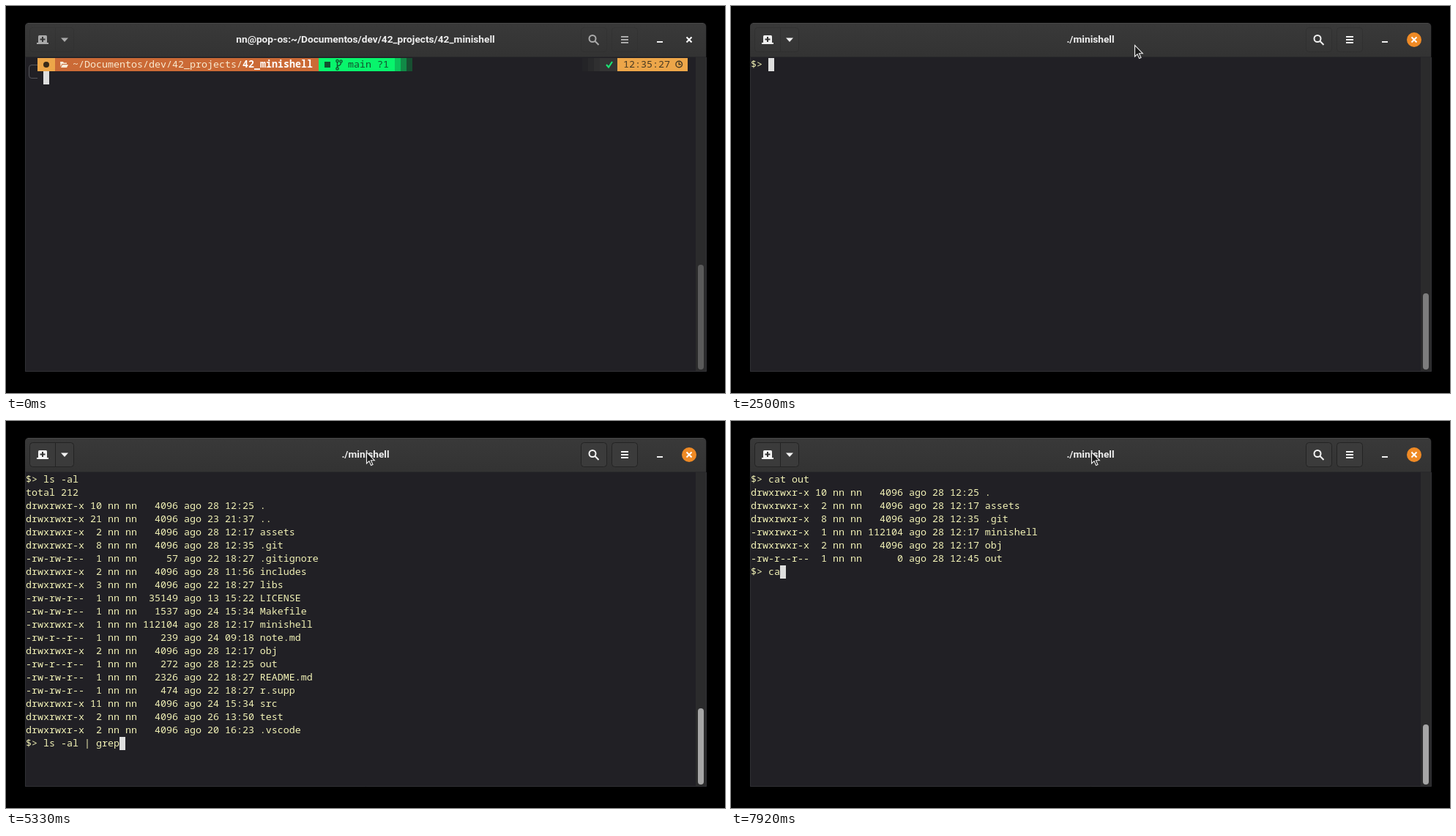
An HTML page with a canvas that plays this animation: 982x528 px, repeating every 8000 ms.

```html
<!DOCTYPE html>
<html lang="en">
<head>
<meta charset="utf-8">
<title>minishell</title>
<style>
html, body { margin: 0; width: 100%; height: 100%; overflow: hidden; background: #000; }
canvas { display: block; }
</style>
</head>
<body>
<canvas id="stage" width="982" height="528"></canvas>
<script>
const ctx = document.getElementById('stage').getContext('2d');
const LOOP = 8000, KEY = 83.3, COL = 8, ROW = 18, LEFT = 27, TOP = 71;
const MONO = '13.333px "Noto Sans Mono", monospace';
const PALE = '#f2f2b6', GREEN = '#22dc78', LIGHT = '#eeeeee';

const clamp = (v, a = 0, b = 1) => Math.min(b, Math.max(a, v));
const ramp = (t, a, b) => clamp((t - a) / (b - a));
const ease = x => x * x * (3 - 2 * x);
const typed = (text, t, start, step = KEY) =>
  text.slice(0, clamp(Math.floor((t - start) / step) + 1, 0, text.length));
const grey = v => `rgb(${v},${v},${v})`;
const mix = (a, b, k) => grey(Math.round(a + (b - a) * k));

// mode, links, size, day, time, name
const listing = `
drwxrwxr-x 10 4096 28 12:25 .
drwxrwxr-x 21 4096 23 21:37 ..
drwxrwxr-x 2 4096 28 12:17 assets
drwxrwxr-x 8 4096 28 12:35 .git
-rw-rw-r-- 1 57 22 18:27 .gitignore
drwxrwxr-x 2 4096 28 11:56 includes
drwxrwxr-x 3 4096 22 18:27 libs
-rw-rw-r-- 1 35149 13 15:22 LICENSE
-rw-rw-r-- 1 1537 24 15:34 Makefile
-rwxrwxr-x 1 112104 28 12:17 minishell
-rw-r--r-- 1 239 24 09:18 note.md
drwxrwxr-x 2 4096 28 12:17 obj
-rw-r--r-- 1 272 28 12:25 out
-rw-rw-r-- 1 2326 22 18:27 README.md
-rw-rw-r-- 1 474 22 18:27 r.supp
drwxrwxr-x 11 4096 24 15:34 src
drwxrwxr-x 2 4096 26 13:50 test
drwxrwxr-x 2 4096 20 16:23 .vscode`.trim().split('\n').map(line => {
  const [mode, links, size, day, time, name] = line.split(' ');
  return `${mode} ${links.padStart(2)} nn nn ${size.padStart(6)} ago ${day} ${time} ${name}`;
});
const matches = listing.filter(l => / 12:/.test(l))
  .map(l => l.replace('272 ago 28 12:25', '  0 ago 28 12:45'));

function rect(x, y, w, h, color) {
  ctx.fillStyle = color;
  ctx.fillRect(x, y, w, h);
}

function round(x, y, w, h, r, fill, stroke) {
  ctx.beginPath();
  ctx.roundRect(x, y, w, h, r);
  if (fill) { ctx.fillStyle = fill; ctx.fill(); }
  if (stroke) { ctx.lineWidth = 1; ctx.strokeStyle = stroke; ctx.stroke(); }
}

function disc(x, y, r, color) {
  ctx.beginPath();
  ctx.arc(x, y, r, 0, 7);
  ctx.fillStyle = color;
  ctx.fill();
}

function path(d, stroke, width = 1, fill) {
  const p = new Path2D(d);
  if (fill) { ctx.fillStyle = fill; ctx.fill(p); }
  if (stroke) { ctx.strokeStyle = stroke; ctx.lineWidth = width; ctx.stroke(p); }
}

function text(s, x, row, color = PALE, bold = false) {
  ctx.font = (bold ? 'bold ' : '') + MONO;
  ctx.textAlign = 'left';
  ctx.fillStyle = color;
  ctx.fillText(s, x, TOP + row * ROW + 13);
}

const caret = (col, row) => rect(LEFT + col * COL, TOP + row * ROW, COL, ROW, '#dedede');

function frame(title, focus) {
  rect(0, 0, 982, 528, '#000');
  round(26, 23, 930.5, 476, [5, 5, 0, 0], '#212025');
  const bar = ctx.createLinearGradient(0, 23, 0, 69);
  bar.addColorStop(0, '#393939');
  bar.addColorStop(1, '#333333');
  round(26, 23, 930, 46, [5, 5, 0, 0], bar);
  rect(30, 23, 922, 1, '#474747');
  rect(26, 69, 930, 1, '#29292b');
  rect(942, 70, 14, 429, '#2b2b2c');
  path('M26.5 70V498.5H956.5V70', '#303034');

  ctx.globalAlpha = 0.15 + 0.85 * ramp(focus, 0.4, 1);
  for (const [x, w] of [[32.5, 60], [785.5, 35], [827.5, 35]])
    round(x, 29.5, w, 33, 4, '#3b3b3b', '#232323');
  rect(67, 30, 1, 32, '#232323');
  ctx.globalAlpha = 1;

  const icon = mix(170, 245, clamp(focus * 2));
  round(44, 40, 12, 11, 1.5, icon);
  rect(42, 50, 16, 2, icon);
  path('M50 42V49M46.5 45.5H53.5', '#363636', 2);
  path('M75 43.5H85L80 49Z', null, 0, icon);
  path('M805.5 44.5a4.5 4.5 0 1 1-9 0a4.5 4.5 0 1 1 9 0M804.5 48L809.5 53', icon, 2);
  for (const y of [41, 45, 49]) rect(840, y, 10, 2, icon);
  rect(889, 48, 8, 2, LIGHT);
  if (focus > 0.05) disc(933, 46, 10, '#ef8a25');
  path('M929.5 42.5L936.5 49.5M936.5 42.5L929.5 49.5', '#fff', 2);

  ctx.font = 'bold 13.7px Roboto, sans-serif';
  ctx.textAlign = 'center';
  ctx.fillStyle = LIGHT;
  ctx.fillText(title, 491, 50);
}

function prompt(input) {
  path('M43 80.5H35Q31.5 80.5 31.5 84V95Q31.5 98.5 35 98.5H43', '#55555a');
  rect(43, 71, 24, 18, '#eda649');
  disc(55, 80, 4, '#3a2a18');
  rect(67, 71, 360, 18, '#cb6a36');
  path('M74 76H78L79 77.5H83V79H76.5L74.5 83ZM77 80H85L83 84H75Z', null, 0, '#f6ead8');
  text('~/Documentos/dev/42_projects/', 91, 0, '#f8ead0');
  text('42_minishell', 323, 0, '#fff', true);

  rect(427, 71, 104, 18, '#08f56c');
  ['#0ac45b', '#118a46', '#184f31'].forEach((c, i) => rect(531 + i * 8, 71, 8, 18, c));
  rect(435, 76, 8, 8, '#12502e');
  path('M452.5 77V84M452.5 82Q457.5 81 457.5 77.5', '#12502e', 1.4);
  for (const [x, y] of [[452.5, 75], [452.5, 85.5], [457.5, 75.5]]) {
    ctx.beginPath();
    ctx.arc(x, y, 1.6, 0, 7);
    ctx.stroke();
  }
  text('main ?1', 467, 0, '#12502e');

  ['#242427', '#29292b', '#2f2f30'].forEach((c, i) => rect(787 + i * 8, 71, 8, 18, c));
  rect(811, 71, 24, 18, '#343434');
  path('M820 80L823 83.5L828 76', '#1be574', 2.2);
  rect(835, 71, 96, 18, '#eda649');
  text('12:35:27', 843, 0, '#493a22');
  path('M923.5 79.5a4.3 4.3 0 1 1-8.6 0a4.3 4.3 0 1 1 8.6 0M919.2 76.5V79.7H921.8', '#493a22', 1.4);

  text(input, LEFT + 3 * COL, 1, GREEN);
  caret(3 + input.length, 1);
}

function screen(lines, input) {
  lines.forEach((l, i) => text(l, LEFT, i));
  text('$> ' + input, LEFT, lines.length);
  caret(3 + input.length, lines.length);
}

function terminal(t) {
  if (t < 745) {
    prompt(t < 575 ? typed('./m', t, 325) : './minishell');
  } else if (t < 1495) {
    path('M30 74.5L34.5 80L30 85.5', '#7cc73a', 2.4);
    text('./minishell', 43, 0, GREEN);
    if (t < 910) caret(0, 1);
    else { text('$>', LEFT, 1, '#ece9d0'); caret(3, 1); }
  } else if (t < 3825) {
    screen([], typed('ls -al', t, 3165));
  } else if (t < 6495) {
    const input = t < 4245 ? ''
      : 'ls -al' + typed(' | grep 12 > ', t, 4665, 104) + typed('out', t, 6075);
    screen(['$> ls -al', 'total 212', ...listing], input);
  } else if (t < 6745) {
    screen(['$> ls -al', 'total 212', ...listing, '$> ls -al | grep 12 > out'], '');
  } else if (t < 7665) {
    screen([], typed('cat out', t, 6915));
  } else {
    screen(['$> cat out', ...matches], typed('ca', t, 7825));
  }
}

function pointer(t) {
  if (t < 1995) return;
  const a = ease(ramp(t, 2000, 2420)), b = ease(ramp(t, 2520, 3150));
  ctx.save();
  ctx.translate(590 - 39 * a - 59 * b, 20 + 33 * a - 11 * b);
  path('M.5 .5V16L4 12.6L6.6 18.5L9 17.4L6.4 11.7H11.3Z', '#f2f2f2', 1.1, '#1c1c1c');
  ctx.restore();
}

function draw(now) {
  const t = now % LOOP;
  const focus = t < 2240 ? ramp(t, 20, 260)
    : t < 2415 ? 1 - ramp(t, 2240, 2400) : ramp(t, 2415, 2600);
  frame(t < 745 ? 'nn@pop-os:~/Documentos/dev/42_projects/42_minishell' : './minishell', focus);
  const top = t < 1495 ? 353 : t < 6745 ? 392 : 414;
  round(945, top, 8, 496 - top, 4, mix(90, 166, focus));
  terminal(t);
  pointer(t);
  requestAnimationFrame(() => draw(performance.now() - start));
}

const start = performance.now();
draw(0);
</script>
</body>
</html>
```
